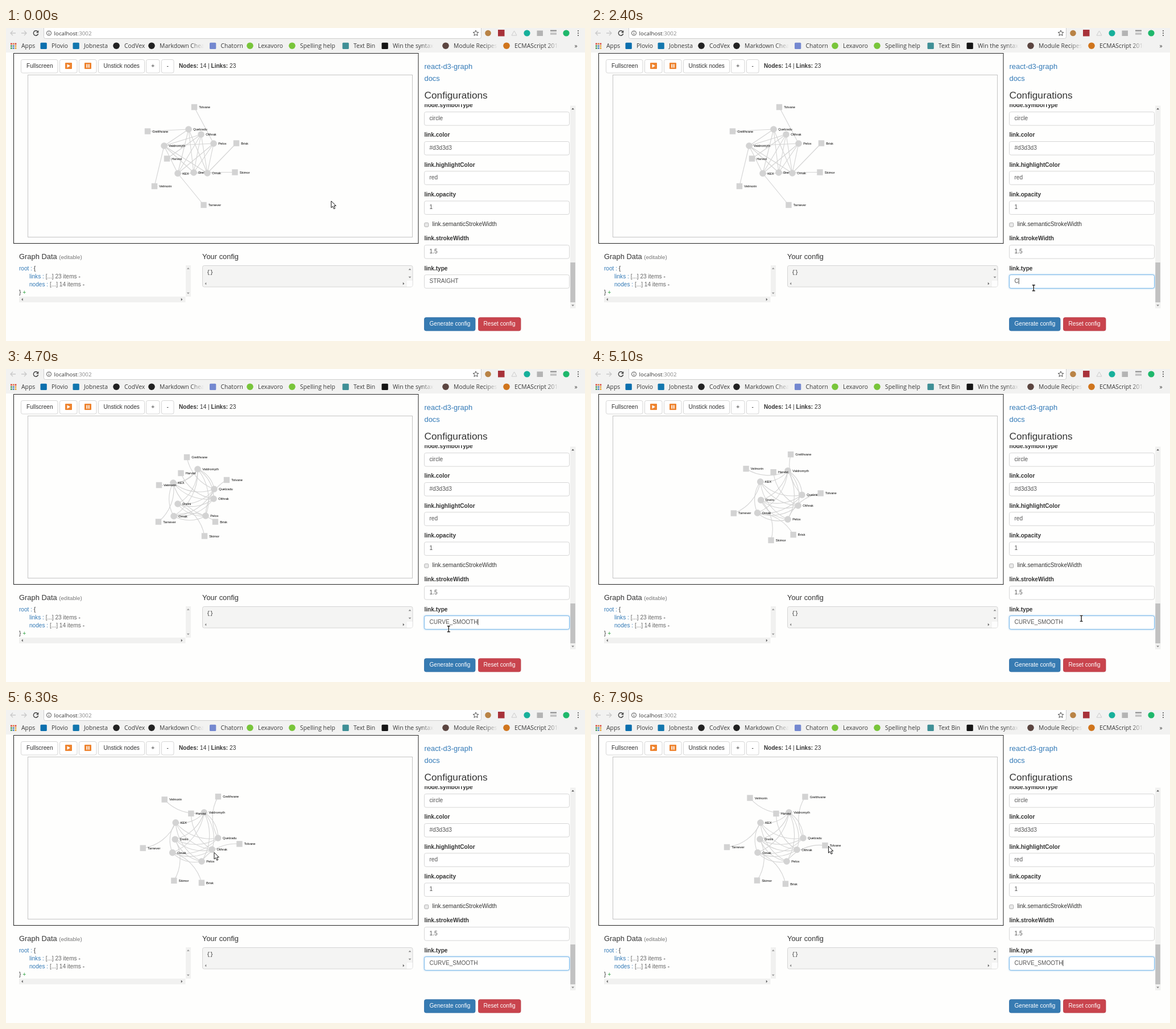
An HTML page for the animation above (8000 ms loop, 1018 px wide and 550 px high).

```html
<!DOCTYPE html>
<html lang="en">
<head>
<meta charset="utf-8">
<title>Graph playground</title>
<style>
html, body { margin: 0; width: 100%; height: 100%; overflow: hidden; background: #fefefd; }
svg { display: block; width: 100vw; height: 100vh; }
text { font: 10.1px "Liberation Sans", Arial, sans-serif; fill: #333; white-space: pre; }
.bold { font-weight: bold; }
.mark { font: 10.4px "Open Sans", "Noto Sans", sans-serif; fill: #3a3a3a; }
.url { font: 9.8px "Open Sans", "Noto Sans", sans-serif; }
.link { font-size: 12.9px; fill: #337ab7; }
.h4 { font-size: 12.9px; }
.h3 { font-size: 17.25px; }
.small { font-size: 9.7px; fill: #777; }
.key { fill: #337ab7; }
.dim { fill: #666; }
.plus { fill: #2a9d3c; }
.val { fill: #555; }
.white { fill: #fff; }
.code { font: 9.4px "Liberation Mono", monospace; }
.node text { font-size: 5.76px; fill: #000; }
.node { fill: #d3d3d3; }
.edge { fill: none; stroke: #d3d3d3; stroke-width: 1.09; }
</style>
</head>
<body>
<svg id="stage" viewBox="0 0 1018 550" preserveAspectRatio="none"></svg>
<script>
const LOOP = 8000, RESTART = 4200, TURN = 4700, SETTLE = 5500, END = 7900;
const stage = document.getElementById('stage');

// Positions of each node: at rest, on restart, after the turn, settling, settled
const nodes = {
  Valdromyth: [[278, 207], [282, 204], [337, 176], [349, 180], [348, 180]],
  Quelzadu: [[321, 178], [321, 184], [366, 211], [372, 225], [373, 225]],
  Olthrak: [[343, 187], [340, 186], [365, 228], [363, 244], [362, 245.5]],
  Pelox: [[365, 203], [367, 203], [351, 258], [344, 266], [344, 266]],
  Drelni: [[330, 254], [329, 252], [302, 237], [298, 228], [297, 227]],
  Ornak: [[354, 255], [356, 264], [295, 258.5], [292, 251], [293, 250.5]],
  KEX: [[302, 255.5], [298, 247], [294, 200], [299, 197.5], [298, 198]],
  Velmorin: [[261, 278], [262, 274], [269, 204], [277, 165.5], [279.5, 154.5]],
  Grelthvane: [[249, 181.5], [249.5, 181.5], [318, 155], [363, 152], [376.5, 152.5]],
  Harvist: [[283, 229.5], [283, 230], [307.5, 183], [325, 181.5], [325.5, 182]],
  Tolvane: [[331, 139], [332, 140], [388, 195], [407, 228], [411.5, 238]],
  Skimor: [[402.5, 253.5], [401, 254], [349, 293.5], [305, 300], [292, 299.5]],
  Brisk: [[405, 202.5], [402, 208], [368, 268.5], [349, 298], [342, 305.5]],
  Tarnever: [[347.5, 311], [342, 304], [268, 268.5], [246, 247], [239, 241]]
};
const names = Object.keys(nodes);

// Hub 0 reaches every hub, 1-3 reach 4-6, each hub owns one square
const links = [[5, 6]];
for (let i = 1; i < 7; i++) links.push([0, i]);
for (let i = 1; i < 4; i++) for (let j = 4; j < 7; j++) links.push([i, j]);
for (let i = 0; i < 7; i++) links.push([i, i + 7]);

const rect = (x, y, w, h, fill, more = '') =>
  `<rect x="${x}" y="${y}" width="${w}" height="${h}" fill="${fill}" ${more}/>`;
const dot = (x, y, r, fill) => `<circle cx="${x}" cy="${y}" r="${r}" fill="${fill}"/>`;
const text = (x, y, str, cls = '') => `<text x="${x}" y="${y}" class="${cls}">${str}</text>`;
const line = (d, color, width = 1.3) =>
  `<path d="${d}" fill="none" stroke="${color}" stroke-width="${width}"/>`;
const box = (x, y, w, h, fill = '#fff', stroke = '#ccc') =>
  rect(x, y, w, h, fill, `rx="3" stroke="${stroke}" stroke-width=".8"`);
const tri = (x, y, turn, fill = '#666', s = 1) =>
  `<path d="M-2.4 1.2H2.4L0-1.4Z" fill="${fill}" transform="translate(${x} ${y}) rotate(${turn}) scale(${s})"/>`;
const fade = (x, w) => rect(x - w, 23, w, 17, 'url(#fade)') + rect(x, 23, 6, 17, '#f2f2f1');

function browserBar() {
  let s = rect(0, 0, 1018, 43, '#f2f2f1');
  s += box(66.5, -6, 769, 24.5, '#fff', '#c4c4c4');
  s += line('M17 9H8M12 5L8 9L12 13', '#c9c9c9') + line('M27 9H36M32 5L36 9L32 13', '#c9c9c9');
  s += line('M55.5 6A4.2 4.2 0 1 0 56.6 10', '#444', 1.4) + '<path d="M57.3 4V8.4H52.8Z" fill="#444"/>';
  s += `<circle cx="75.5" cy="9" r="4" fill="none" stroke="#555"/>` + line('M75.5 8.3V11.4M75.5 6.4V7.4', '#555', 1);
  s += text(84.5, 12.6, 'localhost<tspan fill="#888">:3002</tspan>', 'url');
  s += `<path d="M826 4l1.4 3.3 3.5.3-2.7 2.3.9 3.5-3.1-1.9-3.1 1.9.9-3.5-2.7-2.3 3.5-.3Z" fill="none" stroke="#555"/>`;
  s += dot(847.5, 9, 5.3, '#b98346') + rect(865, 3, 11.5, 11.5, '#a8323a');
  s += '<path d="M893.5 5L898 13H889Z" fill="none" stroke="#ccc"/>';
  s += dot(916, 9, 5.6, '#17b09b') + rect(933.5, 4.5, 10.5, 9.5, '#b4b4b4');
  s += rect(957, 3.5, 11, 2.5, '#999') + rect(957, 8, 11, 4, '#c6c6c6') + dot(985, 9, 5.6, '#1fb86c');
  for (let i = 0; i < 3; i++) s += dot(1006, 5 + i * 4, 1.1, '#555');

  const grid = ['#d9453a', '#e0773c', '#d9453a', '#4b9a55', '#4a80c4', '#e3a53c', '#4b9a55', '#4a80c4', '#e3a53c'];
  grid.forEach((c, i) => s += rect(8 + i % 3 * 3.8, 26.5 + (i / 3 | 0) * 3.8, 2.7, 2.7, c));
  const marks = [
    [27, 'Apps'], [80, 'Plovio', '#0b6fae'], [137, 'Jobnesta', '#1377ae'], [208, 'CodVex', '#222', 1],
    [270, 'Markdown Cheat', '#222', 1], [377.5, 'Chatorn', '#7488d0'], [443, 'Lexavoro', '#78c53a', 1],
    [517, 'Spelling help', '#78c53a', 1], [611, 'Text Bin', '#3f8f96'], [680, 'Win the syntax', '#151515'],
    [787, 'Module Recipes', '#5b4540', 1], [894, 'ECMAScript 2016', '#d0751d', 1]
  ];
  for (const [x, label, color, round] of marks) {
    if (color) s += round ? dot(x - 14, 31.2, 5.8, color) : rect(x - 19.5, 25.7, 11.3, 11.3, color, 'rx="1.5"');
    s += text(x, 34.7, label, 'mark');
  }
  s += fade(348, 24) + fade(752, 22) + fade(864, 22) + fade(972, 22);
  return s + text(999.5, 34.5, '»', 'mark');
}

function leftPanel() {
  let s = rect(13.5, 44.5, 711.5, 334, 'none', 'stroke="#222"');
  for (const [x, w, label, dx] of [[26.5, 64.5, 'Fullscreen', 9.5], [94.5, 30.5], [128.5, 30.5],
    [162.5, 81, 'Unstick nodes', 9], [246.5, 23.5, '+', 8.8], [273.5, 21.5, '-', 9]]) {
    s += box(x, 55.5, w, 23.5);
    if (label) s += text(x + dx, 70.3, label);
  }
  s += rect(104, 61, 12, 11, '#ee8430', 'rx="1"') + '<path d="M107.5 63.5V69.7L113 66.6Z" fill="#fff"/>';
  s += rect(138, 61, 12, 11, '#ee8430', 'rx="1"') + rect(141.4, 63.5, 1.8, 6.2, '#fff') + rect(144.8, 63.5, 1.8, 6.2, '#fff');
  s += text(304, 70.3, '<tspan class="bold">Nodes:</tspan> 14 | <tspan class="bold">Links:</tspan> 23');
  s += rect(38.5, 82.5, 676, 285, 'none', 'stroke="#c4c4c4"');

  s += text(23, 406, 'Graph Data <tspan class="small">(editable)</tspan>', 'h4');
  s += text(23, 426, '<tspan class="key">root :</tspan> {');
  s += text(41, 440, '<tspan class="key">links :</tspan> <tspan class="dim">[...] 23 items</tspan> -');
  s += text(41, 454, '<tspan class="key">nodes :</tspan> <tspan class="dim">[...] 14 items</tspan> -');
  s += text(23, 468, '} <tspan class="plus">+</tspan>');
  s += rect(316, 417, 9, 55, '#f1f1f0') + rect(23, 472, 292.5, 10, '#f1f1f0');
  s += tri(320.3, 422.5, 0, '#999') + tri(320.3, 466, 180, '#999') + tri(28.5, 477, -90) + tri(309, 477, 90);

  s += text(345, 406, 'Your config', 'h4') + box(345.5, 417.5, 369.5, 37.5, '#f4f4f3');
  s += rect(705, 444, 9.5, 10.5, '#fdfdfd') + text(353, 432, '{}', 'code');
  return s + tri(710, 424, 0, '#888') + tri(710, 438, 180, '#888') + tri(351, 449.2, -90, '#888') + tri(699, 449.2, 90);
}

function rightPanel() {
  let s = text(735.5, 71.5, 'react-d3-graph', 'link') + text(735.5, 92.5, 'docs', 'link');
  s += text(735.5, 124, 'Configurations', 'h3');
  const fields = [[147.5, 'node.symbolType', 'circle'], [199.5, 'link.color', '#d3d3d3'],
    [251.7, 'link.highlightColor', 'red'], [304, 'link.opacity', '1'], [381.5, 'link.strokeWidth', '1.5'],
    [433.7, 'link.type', '']];
  s += '<g clip-path="url(#scroll)">';
  for (const [y, label, value] of fields) {
    s += text(735.5, y - 8.2, label, 'bold') + box(735.5, y, 255, 23.6) + text(744.5, y + 14.2, value, 'val');
  }
  s += rect(735.8, 342.3, 7, 7, '#e8e8e8', 'rx="1.5" stroke="#aaa" stroke-width=".9"');
  s += text(749.5, 348.3, 'link.semanticStrokeWidth') + '</g>';
  s += rect(992, 136.5, 9.5, 356, '#f1f1f0') + rect(992.3, 412, 8.6, 70, '#c1c1c1');
  s += tri(996.6, 142, 0, '#555') + tri(996.6, 487.5, 180, '#888');
  s += box(735.5, 508.8, 89.5, 23.2, '#377bb2', '#2e6da4') + text(744.5, 523.4, 'Generate config', 'white');
  return s + box(830.5, 508.8, 74.5, 23.2, '#c9444d', '#b83d47') + text(839.5, 523.4, 'Reset config', 'white');
}

const glyph = (name, i) => `<g class="node">${i < 7 ? '<circle r="5.8"/>'
  : '<rect x="-5.2" y="-5.2" width="10.4" height="10.4"/>'}<text x="8.2" y="2">${name}</text></g>`;

stage.innerHTML = `<defs>
  <linearGradient id="fade"><stop stop-color="#f2f2f1" stop-opacity="0"/><stop offset="1" stop-color="#f2f2f1"/></linearGradient>
  <clipPath id="scroll"><rect x="730" y="134" width="272" height="360"/></clipPath>
  <filter id="glow" x="-5%" y="-50%" width="110%" height="200%"><feGaussianBlur stdDeviation="1.6"/></filter>
  </defs>` + rect(0, 0, 1018, 550, '#fefefd') + browserBar() + leftPanel() + rightPanel() + `
  <g id="focus">${rect(735, 433.2, 256, 24.6, '#8fc4ee', 'rx="3" filter="url(#glow)"')}${box(735.5, 433.7, 255, 23.6, '#fff', '#66afe9')}</g>
  ${rect(744.3, 439, 51.5, 11.5, '#cbe4fa', 'id="mark"')}
  ${text(744.5, 447.9, '', 'val').replace('<text', '<text id="typed"')}
  ${rect(0, 439.3, 0.8, 10.7, '#222', 'id="caret"')}
  <g>${links.map(() => '<path class="edge"/>').join('')}</g>
  <g>${names.map(glyph).join('')}</g>
  <path id="arrow" d="M0 0V11.8L2.7 9.3L4.7 13.8L6.8 12.9L4.9 8.5H8.4Z" fill="#fff" stroke="#111" stroke-width="1"/>
  <g id="beam" fill="none"><path d="M-2.5-5H2.5M-2.5 5H2.5M0-5V5" stroke="#fff" stroke-width="3"/>
  <path d="M-2.5-5H2.5M-2.5 5H2.5M0-5V5" stroke="#222" stroke-width="1.4"/></g>`;

const el = id => document.getElementById(id);
const [focus, mark, typed, caret, arrow, beam] = ['focus', 'mark', 'typed', 'caret', 'arrow', 'beam'].map(el);
const edgeEls = stage.querySelectorAll('.edge'), nodeEls = stage.querySelectorAll('.node');
const show = (e, on) => e.setAttribute('visibility', on ? 'visible' : 'hidden');
const clamp = v => Math.max(0, Math.min(1, v));
const mix = (a, b, k) => a + (b - a) * k;

// Turn a point around the middle of the graph
const CX = 327, CY = 225;
function swing([ax, ay], [bx, by], k) {
  const a = Math.atan2(ay - CY, ax - CX);
  let turn = Math.atan2(by - CY, bx - CX) - a;
  turn -= Math.round(turn / (2 * Math.PI)) * 2 * Math.PI;
  const r = mix(Math.hypot(ax - CX, ay - CY), Math.hypot(bx - CX, by - CY), k);
  return [CX + r * Math.cos(a + turn * k), CY + r * Math.sin(a + turn * k)];
}

function place(p, t) {
  if (t < RESTART) return p[0];
  if (t < TURN) {
    const u = (t - RESTART) / (TURN - RESTART);
    return swing(p[1], p[2], u * (1.35 - 0.35 * u));
  }
  if (t < SETTLE) {
    const u = (t - TURN) / (SETTLE - TURN);
    return swing(p[2], p[3], 1 - (1 - u) ** 2);
  }
  const decay = ms => 1 - Math.exp(-ms / 610);
  return swing(p[3], p[4], decay(t - SETTLE) / decay(END - SETTLE));
}

function drawGraph(t) {
  const pos = names.map(n => place(nodes[n], t));
  pos.forEach(([x, y], i) => nodeEls[i].setAttribute('transform', `translate(${x} ${y})`));
  links.forEach(([a, b], i) => {
    const [x, y] = pos[a], [u, v] = pos[b];
    const r = t < RESTART ? 0 : Math.hypot(u - x, v - y);
    edgeEls[i].setAttribute('d', `M${x} ${y}A${r} ${r} 0 0 1 ${u} ${v}`);
  });
}

const WORD = 'CURVE_SMOOTH';
const strokes = [2400, 2600, 2700, 2900, 3100, 3100, 3500, 3600, 3900, 4000, 4200, 4200];

function drawField(t) {
  const count = strokes.filter(s => s <= t).length;
  const selected = t >= 1700 && t < 2400;
  typed.textContent = count ? WORD.slice(0, count) : 'STRAIGHT';
  typed.style.fill = selected ? '#111' : '';
  focus.setAttribute('opacity', clamp((t - 1200) / 200));
  show(mark, selected);
  const blink = t < RESTART || Math.floor((t - RESTART) / 600) % 2 === 0;
  show(caret, t >= 1300 && !selected && blink);
  caret.setAttribute('x', 744.5 + typed.getComputedTextLength());
}

const route = [[0, 571.8, 304], [800, 571.8, 304], [900, 744.3, 430], [1000, 744.3, 430], [1100, 757, 446],
  [1300, 778.3, 456.7], [5000, 778.3, 456.7], [5200, 946, 420], [5400, 470, 305], [5500, 379, 285.8],
  [6300, 366, 250.3], [7900, 417.5, 239.3]];

function drawPointer(t) {
  const i = Math.max(1, route.findIndex(p => p[0] >= t));
  const [t0, x0, y0] = route[i - 1], [t1, x1, y1] = route[i];
  const k = (t - t0) / (t1 - t0), x = mix(x0, x1, k), y = mix(y0, y1, k);
  const inField = x > 735 && x < 991 && y > 433 && y < 458;
  for (const e of [arrow, beam]) e.setAttribute('transform', `translate(${x} ${y})`);
  show(arrow, !inField);
  show(beam, inField);
}

function draw(ms) {
  const t = Math.floor(ms % LOOP / 100) * 100;
  drawGraph(t);
  drawField(t);
  drawPointer(t);
}

let start;
function tick(now) {
  start ??= now;
  draw(now - start);
  requestAnimationFrame(tick);
}
draw(0);
requestAnimationFrame(tick);
</script>
</body>
</html>
```
